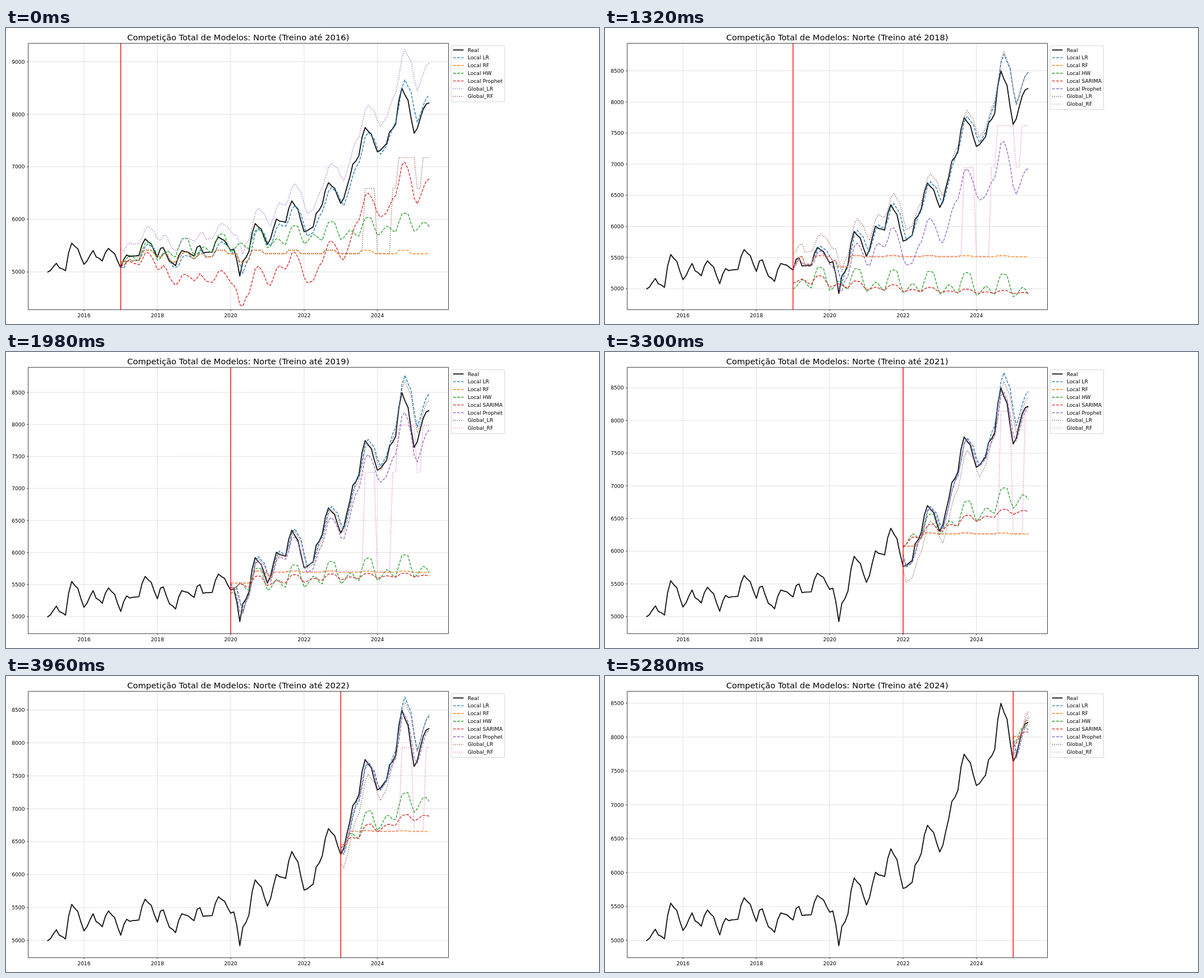
Animation, 1058 px wide and 529 px high, one loop 5.94 s. Source, as an HTML page with a canvas:

```html
<!DOCTYPE html>
<html lang="pt">
<head>
<meta charset="utf-8">
<title>Competição Total de Modelos</title>
<style>
  html, body { margin: 0; width: 100%; height: 100%; overflow: hidden; background: #fff; }
  canvas { display: block; }
</style>
</head>
<body>
<canvas width="1058" height="529"></canvas>
<script>
const ctx = document.querySelector('canvas').getContext('2d');
const STEP = 660, FIRST = 2016, RUNS = 9, LAST = 125;
const BOX = { left: 39.6, right: 789.5, top: 27.4, bottom: 503.4 };
const TAB10 = ['#1f77b4', '#ff7f0e', '#2ca02c', '#d62728', '#9467bd', '#8c564b', '#e377c2'];

// Observed level in January, April, July and September of each year from 2015
const keys = [
  4993, 5163, 5022, 5548, 5145, 5405, 5208, 5448, 5080, 5290, 5310, 5627,
  5278, 5322, 5118, 5405, 5300, 5365, 5378, 5663, 5415, 4922, 5390, 5920,
  5522, 6005, 5942, 6350, 5765, 5855, 6285, 6698, 6305, 6800, 7215, 7748,
  7285, 7440, 7815, 8497, 7640, 8098, 8260];
// How far each month has moved towards the next key
const progress = [0, 0.2, 0.6, 0, 0.6, 0.75, 0, 0.65, 0, 0.15, 0.27, 0.66];

// Model settings for training up to 2016, 2017, 2018, 2020, 2022 and 2024
const settings = {
  high: [9120, 9259, 8748, 8658, 8599, 8497],
  lag: [-90, -140, 20, 20, -50, -170],
  globalStart: [320, 300, 200, -260, -200, -80],
  globalEnd: [620, 860, 0, -190, 30, 100],
  trendStart: [5135, 5216, 4990, 5710, 6390, 7880],
  trendSlope: [79, 95, -21, 125, 275, 400],
  sarimaStart: [5400, 5420, 5190, 5820, 6500, 7950],
  sarimaGain: [60, 65, -270, 600, 680, 1200],
  ceiling: [5345, 5430, 5515, 5870, 6655, 8250],
  bump: [65, 120, 15, 20, 10, 60],
  jump: [7175, 7010, 7620, 8350, 7930, 8350],
  drag: [290, 150, 65, 0, 0, 0],
  dragPower: [0.75, 1.43, 1.6, 1, 1, 1]
};

function setting(name, n) {
  const list = settings[name], p = n < 2 ? n : 1 + n / 2, k = Math.floor(p);
  return list[k] + (p - k) * ((list[k + 1] ?? list[k]) - list[k]);
}

function real(i) {
  const m = i % 12, year = Math.floor(i / 12);
  const k = 4 * year + (m < 3 ? 0 : m < 6 ? 1 : m < 8 ? 2 : 3);
  const spring = m === 1 || m === 2 ? 160 * Math.exp(-(((year - 3.5) / 2) ** 4)) : 0;
  return keys[k] + progress[m] * (keys[k + 1] - keys[k]) + spring;
}

// Small rise around April, broad plateau from August to November
const season = m => 165 * Math.exp(-(((m - 3.2) / 1.8) ** 2)) + 370 * Math.exp(-(((m - 8.9) / 2.2) ** 4));

function buildModels(n) {
  const s = {}, start = 12 * (n + 2);
  for (const name in settings) s[name] = setting(name, n);
  const years = i => (i - start) / 12;
  const recent = i => (real(i) + real(i - 1)) / 2;
  const [low, full] = n < 5 ? [7460, 7790] : [7950, 8050];

  const lr = i => Math.max(real(i - 1), recent(i)) + s.lag + 250 * Math.min(1, Math.max(0, (i - 108) / 9));
  const rf = i => Math.min(Math.max(lr(i), s.ceiling * 0.97), s.ceiling)
    + (i % 12 > 6 && i % 12 < 11 ? s.bump : 0);
  const models = {
    'Local LR': lr,
    'Local RF': rf,
    'Local HW': i => s.trendStart + s.trendSlope * years(i) + season(i % 12),
    'Local SARIMA': i => s.sarimaStart + s.sarimaGain * (1 - Math.exp(-0.4 * years(i)))
      + 0.55 * Math.exp(-0.25 * years(i)) * (season(i % 12) - 180),
    'Local Prophet': i => recent(i) - s.drag * years(i) ** s.dragPower,
    'Global_LR': i => lr(i) + s.globalStart
      + (s.globalEnd - s.globalStart) * ((i - start) / (LAST - start)) ** 2,
    'Global_RF': i => {
      const last = real(i - 1), part = last > full ? 1 : last > low ? 0.68 : 0;
      return part ? s.ceiling + (s.jump - s.ceiling) * part : rf(i) + 8;
    }
  };
  if (n === 0) delete models['Local SARIMA'];
  return { start, models };
}

const dayX = (year, month = 0) => {
  const t0 = Date.UTC(2015, 0), t1 = Date.UTC(2025, 5);
  return 73.7 + 681.6 * (Date.UTC(year, month) - t0) / (t1 - t0);
};

function stroke(points, color, width, dash = []) {
  ctx.beginPath();
  for (const [x, y] of points) ctx.lineTo(x, y);
  ctx.strokeStyle = color;
  ctx.lineWidth = width;
  ctx.setLineDash(dash.map(d => d * width));
  ctx.stroke();
  ctx.setLineDash([]);
}

function text(str, x, y, align, size = 9.18) {
  ctx.font = `${size}px "DejaVu Sans", sans-serif`;
  ctx.textAlign = align;
  ctx.fillStyle = '#000';
  ctx.fillText(str, x, y);
}

function draw(n) {
  const { start, models } = buildModels(n), { left, right, top, bottom } = BOX;
  const high = setting('high', n), low = [4511, 4543, 4857][n] ?? 4922;
  const valueY = v => 481.8 - (v - low) * 432.8 / (high - low);
  const plot = (f, from) => Array.from({ length: LAST + 1 - from },
    (_, j) => [dayX(2015, from + j), valueY(f(from + j))]);

  ctx.fillStyle = '#fff';
  ctx.fillRect(0, 0, 1058, 529);
  ctx.lineJoin = 'round';

  for (let year = 2016; year <= 2024; year += 2) {
    const x = dayX(year);
    stroke([[x, top], [x, bottom]], '#d7d7d7', 0.75);
    stroke([[x, bottom], [x, bottom + 2.5]], '#000', 0.75);
    text(year, x, 517.2, 'center');
  }
  for (let v = 5000; valueY(v) > top; v += n < 2 ? 1000 : 500) {
    const y = valueY(v);
    stroke([[left, y], [right, y]], '#d7d7d7', 0.75);
    stroke([[left - 2.5, y], [left, y]], '#000', 0.75);
    text(v, 33.5, y + 3.4, 'right');
  }

  const series = [{ name: 'Real', points: plot(real, 0), style: ['#111', 1.84] }];
  Object.keys(models).forEach((name, k) => series.push({
    name, points: plot(models[name], start),
    style: [TAB10[k], 1.38, name.startsWith('Global') ? [1, 1.65] : [3.7, 1.6]]
  }));
  for (const s of series) stroke(s.points, ...s.style);

  const cut = dayX(FIRST + n + 1);
  stroke([[cut, top], [cut, bottom]], '#f00', 1.38);
  ctx.strokeStyle = '#000';
  ctx.lineWidth = 0.75;
  ctx.strokeRect(left, top, right - left, bottom - top);
  text(`Competição Total de Modelos: Norte (Treino até ${FIRST + n})`, (left + right) / 2 - 0.3, 21.5, 'center', 14.69);

  ctx.beginPath();
  ctx.roundRect(794.2, 31.8, 95.4, 3.3 + 13.83 * series.length, 1.8);
  ctx.strokeStyle = '#d0d0d0';
  ctx.lineWidth = 0.9;
  ctx.stroke();
  series.forEach((s, k) => {
    const y = 39.3 + 13.83 * k;
    stroke([[797.6, y], [816.4, y]], ...s.style);
    text(s.name, 823.7, y + 3.2, 'left');
  });
}

let shown = -1;
function tick() {
  const n = Math.floor(performance.now() / STEP) % RUNS;
  if (n !== shown) draw(shown = n);
  requestAnimationFrame(tick);
}
tick();
</script>
</body>
</html>
```
